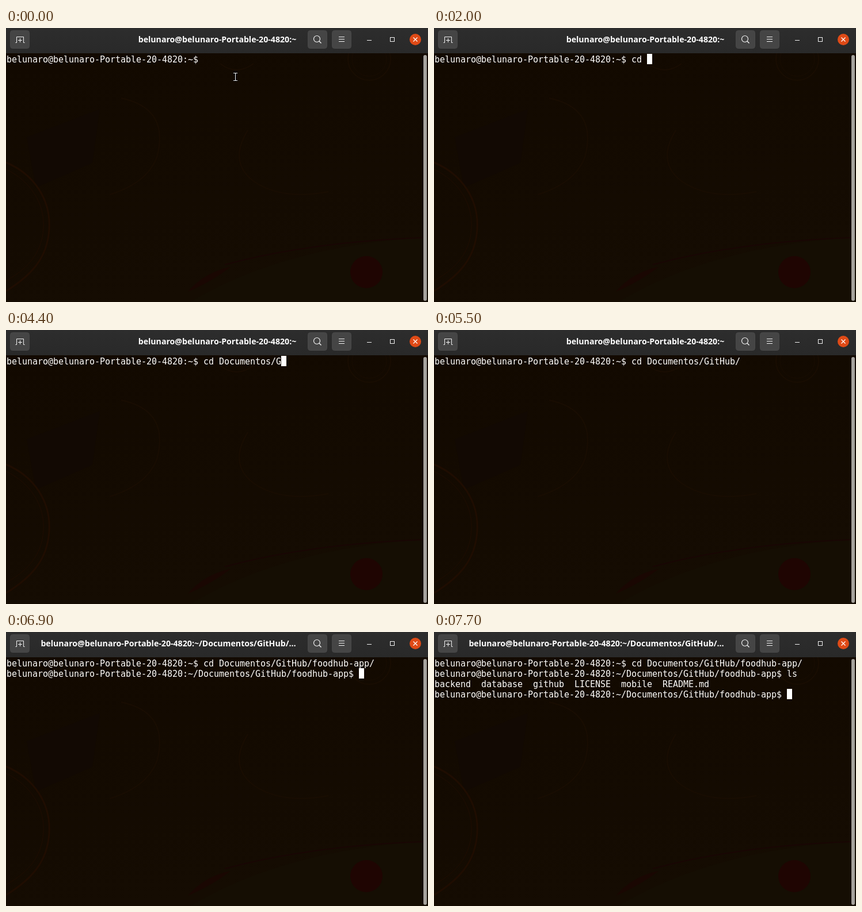
Animation, 733 px wide and 477 px high, one loop 8000 ms. Source, as an HTML page:

```html
<!DOCTYPE html>
<html lang="pt">
<head>
<meta charset="utf-8">
<title>Terminal</title>
<style>
  html, body { margin: 0; width: 100%; height: 100%; overflow: hidden; background: #130a01; }
  #stage { position: relative; width: 733px; height: 477px; overflow: hidden; }
  svg { position: absolute; left: 0; top: 0; }
  #title { font: bold 14.15px "Noto Sans", "Open Sans", sans-serif; fill: #fff; text-anchor: middle; }
  #screen {
    position: absolute; left: 1px; top: 46px; margin: 0;
    font: 15px/18px "DejaVu Sans Mono", monospace; letter-spacing: -.031px;
    color: #fff; white-space: pre;
  }
  #cursor { position: absolute; width: 9px; height: 18px; background: #fff; }
</style>
</head>
<body>
<div id="stage">
  <svg width="733" height="477" viewBox="0 0 733 477">
    <defs>
      <linearGradient id="bar" x2="0" y2="1">
        <stop stop-color="#2d2d2d"/><stop offset="1" stop-color="#292929"/>
      </linearGradient>
      <linearGradient id="wall" x2=".3" y2="1">
        <stop stop-color="#120900"/><stop offset="1" stop-color="#150c02"/>
      </linearGradient>
    </defs>

    <!-- faint wallpaper -->
    <rect y="43" width="733" height="434" fill="url(#wall)"/>
    <path d="M36 190L163 141L150 235L52 278Z" fill="#120903"/>
    <path d="M320 477Q480 380 733 364V477Z" fill="#150e03"/>
    <g fill="none" stroke="#190d02" stroke-width="2">
      <circle cx="631" cy="54" r="37"/>
      <circle cx="631" cy="54" r="30" stroke-width="1"/>
      <path d="M372 62Q400 84 430 62M200 122Q285 140 262 225Q245 270 180 290"/>
      <path d="M420 178Q385 235 432 268Q480 300 560 285"/>
    </g>
    <g fill="none" stroke="#1f0d01" stroke-width="3">
      <path d="M0 234C50 255 78 300 75 350C72 400 45 430 0 458"/>
      <path d="M0 246C42 266 68 305 65 350C62 390 40 418 0 440" stroke-width="1"/>
    </g>
    <path d="M316 459Q345 425 390 416Q360 440 316 459Z" fill="#1a0702"/>
    <path d="M380 412Q530 372 725 365" fill="none" stroke="#190604" stroke-width="2"/>
    <circle cx="626" cy="425" r="28" fill="#1f0502"/>

    <!-- header bar -->
    <rect width="733" height="44" fill="url(#bar)"/>
    <g fill="#454545" stroke="#484848">
      <rect x="7.5" y="4.5" width="33" height="31" rx="4"/>
      <rect x="524.5" y="4.5" width="33" height="31" rx="4"/>
      <rect x="566.5" y="4.5" width="33" height="31" rx="4"/>
    </g>
    <g fill="none" stroke="#f2f2f2">
      <path d="M16.500 25.500H18.500V15.500H30.500V25.500H32.500M24.500 18V25M21 21.500H28"/>
      <circle cx="540" cy="19" r="5.500" stroke-width="1.200"/>
      <path d="M544 23L547.500 26.500" stroke-width="1.400"/>
      <path d="M578 15.500H588M578 19.500H588M578 23.500H588M627 21.500H635"/>
      <rect x="667.500" y="16.500" width="7" height="7"/>
    </g>
    <circle cx="711" cy="20" r="10" fill="#df4a16"/>
    <path d="M707.500 16.500L714.500 23.500M714.500 16.500L707.500 23.500" stroke="#fff" stroke-width="1.300"/>
    <text id="title" y="25"></text>

    <rect x="725" y="47" width="6" height="428" rx="3" fill="#a5a29d"/>

    <g id="pointer" fill="none">
      <path d="M395 78.500H402M398.500 78V92M395 91.500H402" stroke="#000" stroke-width="3"/>
      <path d="M395 78.500H402M398.500 78V92M395 91.500H402" stroke="#fff"/>
    </g>
  </svg>
  <div id="cursor"></div>
  <pre id="screen"></pre>
</div>
<script>
  const LOOP = 8000, CELL_W = 9, CELL_H = 18;
  const $ = id => document.getElementById(id);
  const login = "belunaro@belunaro-Portable-20-4820:";
  const home = login + "~$ ";
  const project = login + "~/Documentos/GitHub/foodhub-app$ ";
  const docs = home + "cd Documentos/";
  const repos = docs + "GitHub/";
  const entered = repos + "foodhub-app/";
  const ready = entered + "\n" + project;
  const listed = ready + "ls\nbackend  database  github  LICENSE  mobile  README.md\n" + project;

  // [start ms, screen text, cursor visible]
  const steps = [
    [0, home, 0], [200, home, 1], [700, home, 0],
    [900, home + "c", 1], [1100, home + "cd", 1], [2000, home + "cd ", 1],
    [2400, home + "cd D", 1], [3200, home + "cd Do", 1], [3300, home + "cd Doc", 1],
    [3600, docs, 1], [4100, docs, 0], [4300, docs, 1], [4400, docs + "G", 1],
    [4900, repos, 1], [5500, repos, 0], [5800, repos + "f", 1],
    [6100, entered, 1], [6700, entered, 0],
    [6900, ready, 1], [7300, ready, 0], [7400, ready, 1], [7500, ready + "l", 1],
    [7700, listed, 1]
  ];
  let shown;

  function show(step) {
    const [start, text, cursorOn] = step;
    const lines = text.split("\n");
    const inProject = lines.length > 1;
    $("screen").textContent = text;
    $("cursor").style.left = 1 + lines.at(-1).length * CELL_W + "px";
    $("cursor").style.top = 45 + (lines.length - 1) * CELL_H + "px";
    $("cursor").style.visibility = cursorOn ? "visible" : "hidden";
    $("pointer").style.visibility = start < 900 ? "visible" : "hidden";
    $("title").textContent = login + (inProject ? "~/Documentos/GitHub/…" : "~");
    $("title").setAttribute("x", inProject ? 282 : 367);
  }

  function frame() {
    const t = performance.now() % LOOP;
    const step = steps.findLast(s => s[0] <= t);
    if (step !== shown) show(shown = step);
    requestAnimationFrame(frame);
  }
  frame();
</script>
</body>
</html>
```
